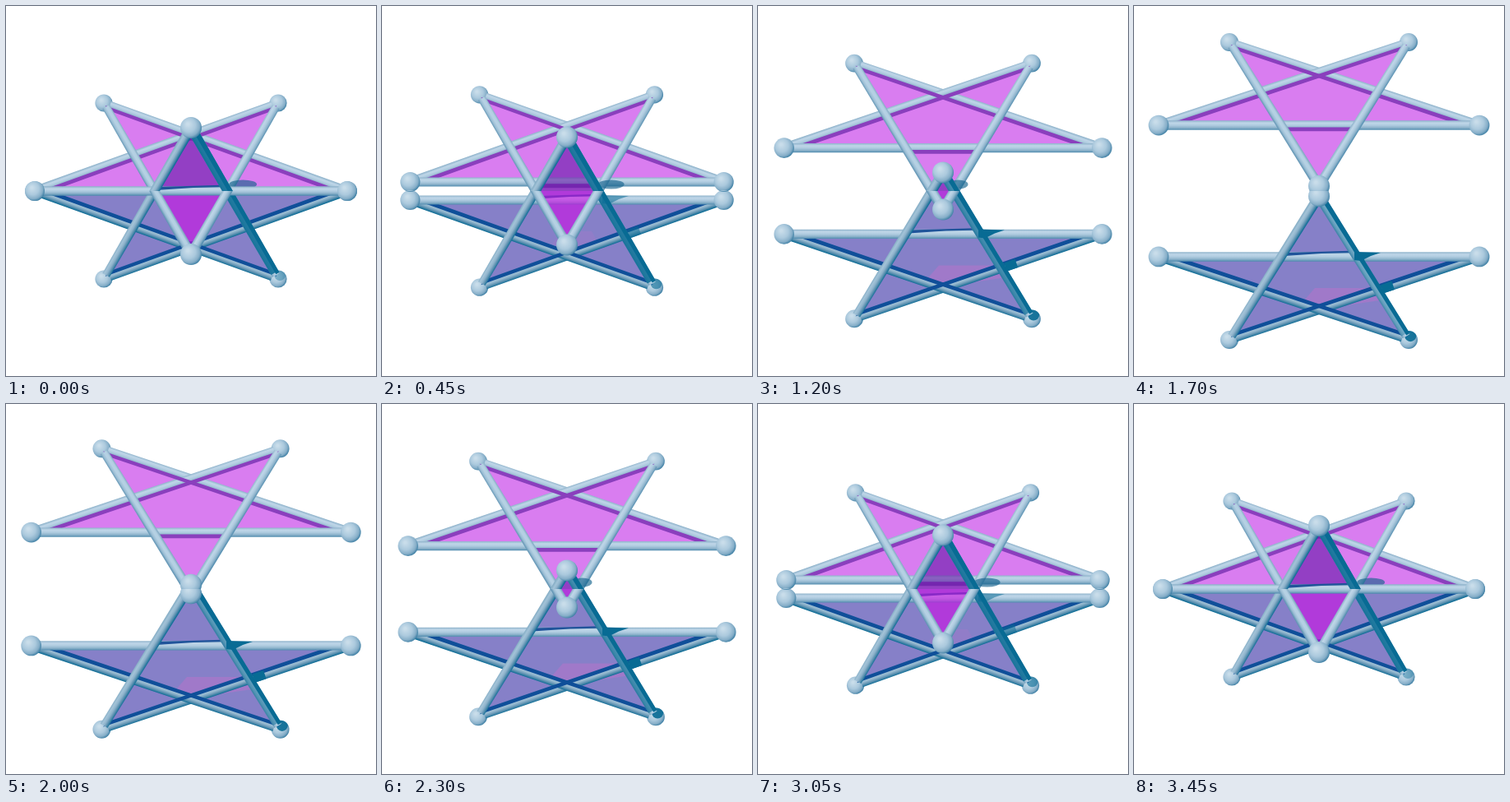
Recreate the animation shown at these times as an HTML page with a canvas. Size 450 by 450 pixels, loop 3500 ms.

```html
<!DOCTYPE html>
<html lang="en">
<head>
<meta charset="utf-8">
<title>Crossing pentagrams</title>
<style>
  html, body { margin: 0; width: 100%; height: 100%; overflow: hidden; background: #fff; }
  canvas { display: block; width: 450px; height: 450px; }
</style>
</head>
<body>
<canvas id="c" width="450" height="450"></canvas>
<script>
const ctx = document.getElementById('c').getContext('2d');
const LOOP = 3500, HOLD = 250, MID = 225;
const TEAL = '#086b94';
// vertex indices: front, right, back right, back left, left
const BACK = [[1, 3], [4, 2]], WIDE = [4, 1], FRONT = [[0, 3], [0, 2]];
// tube tones from the lit side to the dark side
const LIT = ['#8fb3cb', '#bfd6e8', '#b0cce0', '#8fb4cc', '#4f8bae'];
const SOFT = ['#7fa7c1', '#b3cfe2', '#b6d1e4', '#9dbfd5', '#5f93b3'];
const SHADED = ['#86aec6', '#a3c3d8', '#8fb3cb', '#5a90b0', '#0b6b95'];

function star(p, low) {
  const pt = (x, y, r) => ({ x: MID + x, y: low ? 450 - y : y, r });
  const bx = 106 + 3.1 * p, by = 118 - 76.5 * p;
  const wx = 190 + 5.2 * p, wy = 225 - 82.7 * p;
  const br = 10.6 + 0.4 * p, wr = 12 + 0.4 * p;
  return [pt(0, 302 - 86 * p, 13), pt(wx, wy, wr), pt(bx, by, br), pt(-bx, by, br), pt(-wx, wy, wr)];
}

const mix = (a, b, k) => ({ x: a.x + (b.x - a.x) * k, y: a.y + (b.y - a.y) * k, r: a.r + (b.r - a.r) * k });

function poly(pts) {
  ctx.beginPath();
  pts.forEach(q => ctx.lineTo(q.x, q.y));
  ctx.closePath();
}

const starPath = v => poly([0, 2, 4, 1, 3].map(i => v[i]));

// tapered bar between two points, dx/dy shift it
function bar(a, b, fill, dx = 0, dy = 0, size = 0.46) {
  const len = Math.hypot(b.x - a.x, b.y - a.y);
  const nx = -(b.y - a.y) / len, ny = (b.x - a.x) / len;
  const at = (q, s) => ({ x: q.x + dx + nx * q.r * size * s, y: q.y + dy + ny * q.r * size * s });
  poly([at(a, 1), at(b, 1), at(b, -1), at(a, -1)]);
  ctx.fillStyle = fill;
  ctx.fill();
}

function tube(a, b, low) {
  const len = Math.hypot(b.x - a.x, b.y - a.y);
  let nx = -(b.y - a.y) / len, ny = (b.x - a.x) / len;
  let dot = -0.45 * nx - 0.9 * ny;
  if (dot < 0) { nx = -nx; ny = -ny; dot = -dot; }
  const m = mix(a, b, 0.5), w = m.r * 0.46;
  const g = ctx.createLinearGradient(m.x + nx * w, m.y + ny * w, m.x - nx * w, m.y - ny * w);
  const flat = Math.abs(a.y - b.y) < 1;
  const tones = dot < 0.3 ? SOFT : low && !flat ? SHADED : LIT;
  tones.forEach((c, i) => g.addColorStop(i / 4, c));
  bar(a, b, g);
}

// inner side of a tube, seen through the tinted sheet
function rim(v, [a, b], low) {
  ctx.save();
  starPath(v);
  ctx.clip();
  bar(v[a], v[b], low ? '#0f4f99' : '#8a3fbd', 0, low ? -4.8 : 4.8, 0.2);
  ctx.restore();
}

function ball(q, shade = 0) {
  const { x, y, r } = q;
  const g = ctx.createRadialGradient(x - r * 0.3, y - r * 0.35, r * 0.1, x - r * 0.15, y - r * 0.15, r * 1.2);
  g.addColorStop(0, '#c9ddea');
  g.addColorStop(0.5, '#abc9dd');
  g.addColorStop(0.8, '#86aec8');
  g.addColorStop(1, '#3d7fa4');
  ctx.beginPath();
  ctx.arc(x, y, r, 0, 7);
  ctx.fillStyle = g;
  ctx.fill();
  if (shade) {
    ctx.save();
    ctx.clip();
    ctx.globalAlpha = shade;
    ctx.beginPath();
    ctx.arc(x + r * 0.2, y - r * 0.45, r * 0.65, 0, 7);
    ctx.fillStyle = TEAL;
    ctx.fill();
    ctx.restore();
  }
}

function face(v, low, near, p) {
  ctx.save();
  starPath(v);
  ctx.clip();
  ctx.fillStyle = near
    ? (low ? 'rgba(102,23,167,.6)' : 'rgba(207,13,231,.6)')
    : (low ? '#8680c8' : '#d97df0');
  ctx.fillRect(0, 0, 450, 450);
  if (low && !near) {
    // gap of light falling on the lower sheet
    const y = v[1].y + 38, w = 30 + 42 * Math.min(1, Math.max(0, (p - 0.35) / 0.25));
    ctx.globalAlpha = Math.min(1, p * 3);
    poly([{ x: 220, y }, { x: 225 + w, y }, { x: 233 + w, y: y + 14 }, { x: 225, y: y + 26 }, { x: 207, y: y + 15 }]);
    ctx.fillStyle = '#a079c9';
    ctx.fill();
  }
  ctx.restore();
}

// tapering shadow above the lower wide tube
function wedge(y) {
  poly([{ x: 183, y: y - 1 }, { x: 186, y: y - 5 }, { x: 270, y: y - 7.5 }, { x: 270, y: y - 5 }, { x: 228, y: y - 4 }]);
  ctx.fillStyle = '#20549a';
  ctx.fill();
}

function lowShadows(v, p) {
  const y = v[1].y;
  ctx.save();
  ctx.globalAlpha = 0.85 - 0.5 * p * p;
  bar(v[0], mix(v[0], v[2], 0.96), TEAL);
  ctx.globalAlpha = 1;
  bar(v[0], mix(v[0], v[2], 0.97), TEAL, 2.6, -1.5, 0.22);
  if (p > 0) {
    ctx.globalAlpha = Math.min(1, p * 4);
    poly([{ x: 268, y: y + 4 }, { x: 276, y: y + 5 }, { x: 288, y: y - 1 }, { x: 300, y: y - 5 }, { x: 268, y: y - 6 }]);
    ctx.fillStyle = TEAL;
    ctx.fill();
    bar(mix(v[1], v[3], 0.345), mix(v[1], v[3], 0.39), TEAL);
  }
  ctx.restore();
}

// shadow thrown on the upper sheet by the tip in front of it
function tipShadow(tip) {
  const k = MID - tip.y;
  if (k < 8) return;
  const x = MID + k * 0.82;
  ctx.save();
  ctx.globalAlpha = 0.65;
  ctx.fillStyle = '#17658f';
  ctx.beginPath();
  ctx.ellipse(x, 217, 10 + k * 0.09, 5.5, 0, 0, 7);
  ctx.fill();
  ctx.restore();
}

function sheet(v, low, near, p) {
  face(v, low, near, p);
  ball(v[3]);
  ball(v[2], low ? 0.4 + 0.5 * Math.min(1, p * 3) : 0);
  const draw = ([a, b]) => tube(v[a], b === 1 ? v[b] : mix(v[a], v[b], 0.975), low);
  BACK.forEach(draw);
  if (!near) BACK.forEach(e => rim(v, e, low));
  draw(WIDE);
  if (low) wedge(v[1].y);
  else if (!near) rim(v, WIDE, low);
  FRONT.forEach(draw);
  if (low) lowShadows(v, p);
  ball(v[4]);
  ball(v[1]);
  ball(v[0]);
}

function half(y, paint) {
  ctx.save();
  ctx.beginPath();
  ctx.rect(0, y, 450, 225);
  ctx.clip();
  paint();
  ctx.restore();
}

function draw(t) {
  const p = Math.max(0, (Math.min(t, LOOP - t) - HOLD) / (LOOP / 2 - HOLD));
  const top = star(p, false), low = star(p, true);
  const crossed = top[0].y > MID;
  ctx.fillStyle = '#fff';
  ctx.fillRect(0, 0, 450, 450);
  const upper = near => sheet(top, false, near, p);
  const lower = near => sheet(low, true, near, p);
  // the sheets cut through each other on the middle line
  half(0, () => {
    if (crossed) { upper(false); tipShadow(low[0]); lower(true); }
    else { lower(false); upper(false); }
  });
  half(MID, () => {
    if (crossed) { lower(false); upper(true); }
    else { upper(false); lower(false); }
  });
}

function tick() {
  draw(Math.floor((performance.now() % LOOP) / 50) * 50);
  requestAnimationFrame(tick);
}
tick();
</script>
</body>
</html>
```
